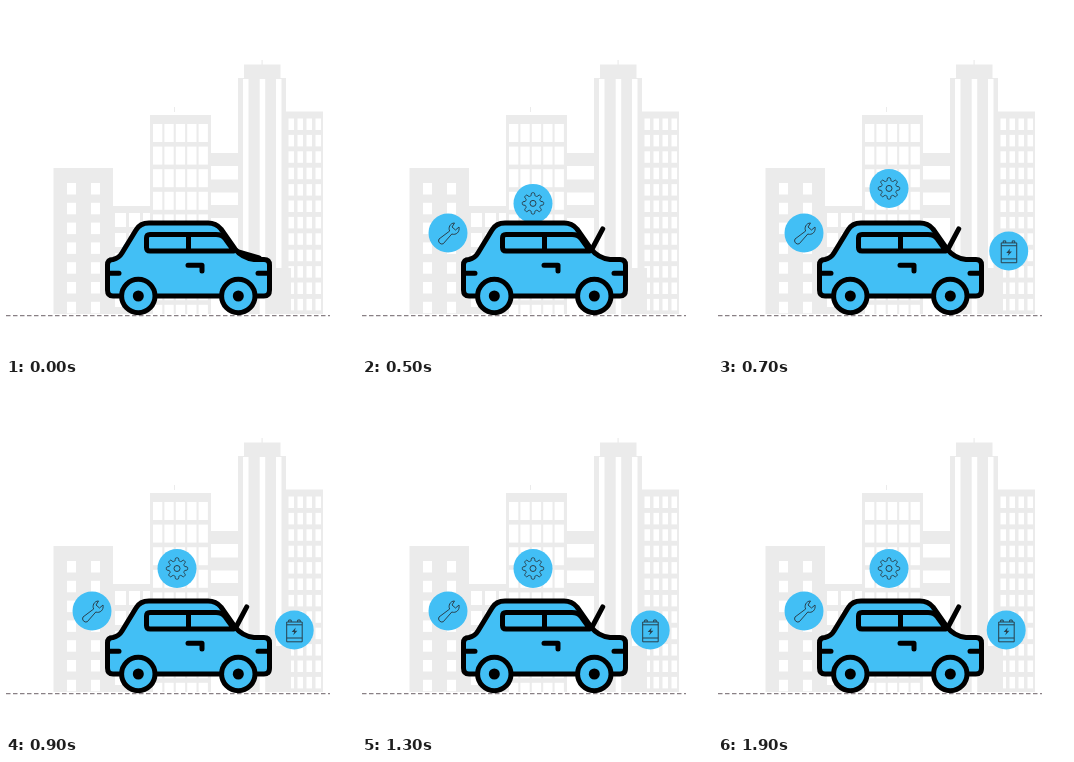
Animation, 350 px wide and 350 px high, one loop 2 s. Source, as an HTML page:

```html
<!DOCTYPE html>
<html lang="en">
<head>
<meta charset="utf-8">
<title>Car service</title>
<style>
  html, body { margin: 0; width: 100%; height: 100%; overflow: hidden; background: #fff; }
  svg { display: block; width: 100vw; height: 100vh; }
  .badge circle.disc { fill: #42bff5; }
  .badge .glyph { fill: none; stroke: #29404d; stroke-width: 1; stroke-linejoin: round; }
  #car, #hood { fill: #42bff5; stroke: #000; stroke-width: 5; stroke-linecap: round; stroke-linejoin: round; }
</style>
</head>
<body>
<svg viewBox="0 0 350 350">
  <g id="city"></g>
  <path d="M0 309.7H324" stroke="#898085" stroke-width="1.3" stroke-dasharray="4.5 2.5"/>

  <g id="wrench" class="badge">
    <circle class="disc" r="19.5"/>
    <path class="glyph" d="M6.5 -10C2 -10 0 -5 1.7 -2L-9 6A3.4 3.4 0 0 0 -4.8 10.8L3.8 1C8 2.5 12 -1 11 -6L7.5 -3L4 -6Z"/>
  </g>
  <g id="gear" class="badge">
    <circle class="disc" r="19.5"/>
    <path class="glyph" id="teeth"/>
    <circle class="glyph" r="3"/>
  </g>
  <g id="battery" class="badge">
    <circle class="disc" r="19.5"/>
    <path class="glyph" d="M-7.5 -8H8V11.8H-7.5ZM-7.5 -5.2H8M-7.5 8H8M-5.5 -8V-10H-3V-8M3.5 -8V-10H6V-8"/>
    <path fill="#29404d" d="M1.5 -2.5L-2.5 2H0L-1 5.2L3.2 .7H.7Z"/>
  </g>

  <path id="hood" d="M229 245H254"/>
  <g id="car">
    <path d="M107 290Q101.5 290 101.5 284V259Q101.5 253.5 107 253.5Q113 252 116 247L130 224Q134 217 143 217H202Q210 217 215 223L229 243Q236 252 248 253.5H258Q263.5 253.5 263.5 259V284Q263.5 290 258 290Z"/>
    <path d="M144 228.5H210Q216 228.5 219 232.5L228 245H144Q140.5 245 140.5 241.5V232Q140.5 228.5 144 228.5ZM182.5 228.5V245"/>
    <path fill="none" d="M182 259.3H196V265M104 267.3H113M252 267.3H261"/>
    <circle cx="132.3" cy="290" r="16.7"/>
    <circle cx="232.3" cy="290" r="16.7"/>
    <circle cx="132.3" cy="290" r="5.5" fill="#000" stroke="none"/>
    <circle cx="232.3" cy="290" r="5.5" fill="#000" stroke="none"/>
  </g>
</svg>
<script>
const byId = id => document.getElementById(id);
const LOOP = 2000, STEP = 100;
const GRAY = '#ebebeb', WHITE = '#fff';

function box(x, y, right, bottom, fill = GRAY) {
  const rect = document.createElementNS('http://www.w3.org/2000/svg', 'rect');
  const values = { x, y, width: right - x, height: bottom - y, fill };
  for (const key in values) rect.setAttribute(key, values[key]);
  byId('city').append(rect);
}

function windows(x, y, w, h, dx, dy, cols, rows) {
  for (let row = 0; row < rows; row++)
    for (let col = 0; col < cols; col++) {
      const left = x + col * dx, top = y + row * dy;
      box(left, top, left + w, Math.min(308, top + h), WHITE);
    }
}

function drawCity() {
  box(107, 200, 205, 308);
  windows(109, 207, 11, 14, 14, 20, 5, 5);

  box(47.5, 162, 107, 308);
  windows(61, 177, 9, 11.5, 24, 19.8, 2, 7);

  box(144, 109, 205, 308);
  box(168, 101, 169, 106);
  windows(147, 118, 9.3, 18, 11.4, 22.6, 5, 9);

  for (const y of [147, 173.5, 199]) box(205, y, 232, y + 13);

  box(280, 105.5, 317, 308);
  windows(282.5, 112.5, 5.5, 11.5, 9, 16.4, 4, 12);

  box(232, 72, 280, 308);
  box(238, 58.5, 274.5, 72);
  box(255.5, 54, 256.7, 59);
  for (const x of [237, 253.7, 270]) box(x, 73, x + 5.5, 308, WHITE);
  box(269, 262, 285, 308);
}

function gearPath() {
  const points = [];
  for (let i = 0; i < 128; i++) {
    const a = i / 128 * 2 * Math.PI;
    const r = 9.2 + 1.5 * Math.tanh(2.5 * Math.cos(8 * a));
    points.push((r * Math.cos(a)).toFixed(2) + ' ' + (r * Math.sin(a)).toFixed(2));
  }
  return 'M' + points.join('L') + 'Z';
}

// Each badge springs from behind the car; steps are progress per 100 ms.
const badges = [
  { id: 'wrench', from: [134, 250], to: [86, 227], start: 1, steps: [.4, 1.09, 1] },
  { id: 'gear', from: [171, 236], to: [171, 184.5], start: 4, steps: [.2, .75, 1.17, 1.04, 1] },
  { id: 'battery', from: [232, 270], to: [288.2, 246], start: 6, steps: [.4, 1.045, 1.09, 1] }
];
const hoodAngles = [16, -25, -62];

function poseAt(steps, index, rest) {
  return index < 0 ? rest : steps[Math.min(index, steps.length - 1)];
}

function render(now) {
  const step = Math.floor(now % LOOP / STEP);
  for (const { id, from, to, start, steps } of badges) {
    const p = poseAt(steps, step - start, 0);
    const [x, y] = from.map((v, i) => v + (to[i] - v) * p);
    byId(id).setAttribute('transform', `translate(${x} ${y})`);
  }
  byId('hood').setAttribute('transform', `rotate(${poseAt(hoodAngles, step, 0)} 229 245)`);
  requestAnimationFrame(render);
}

drawCity();
byId('teeth').setAttribute('d', gearPath());
render(performance.now());
</script>
</body>
</html>
```
